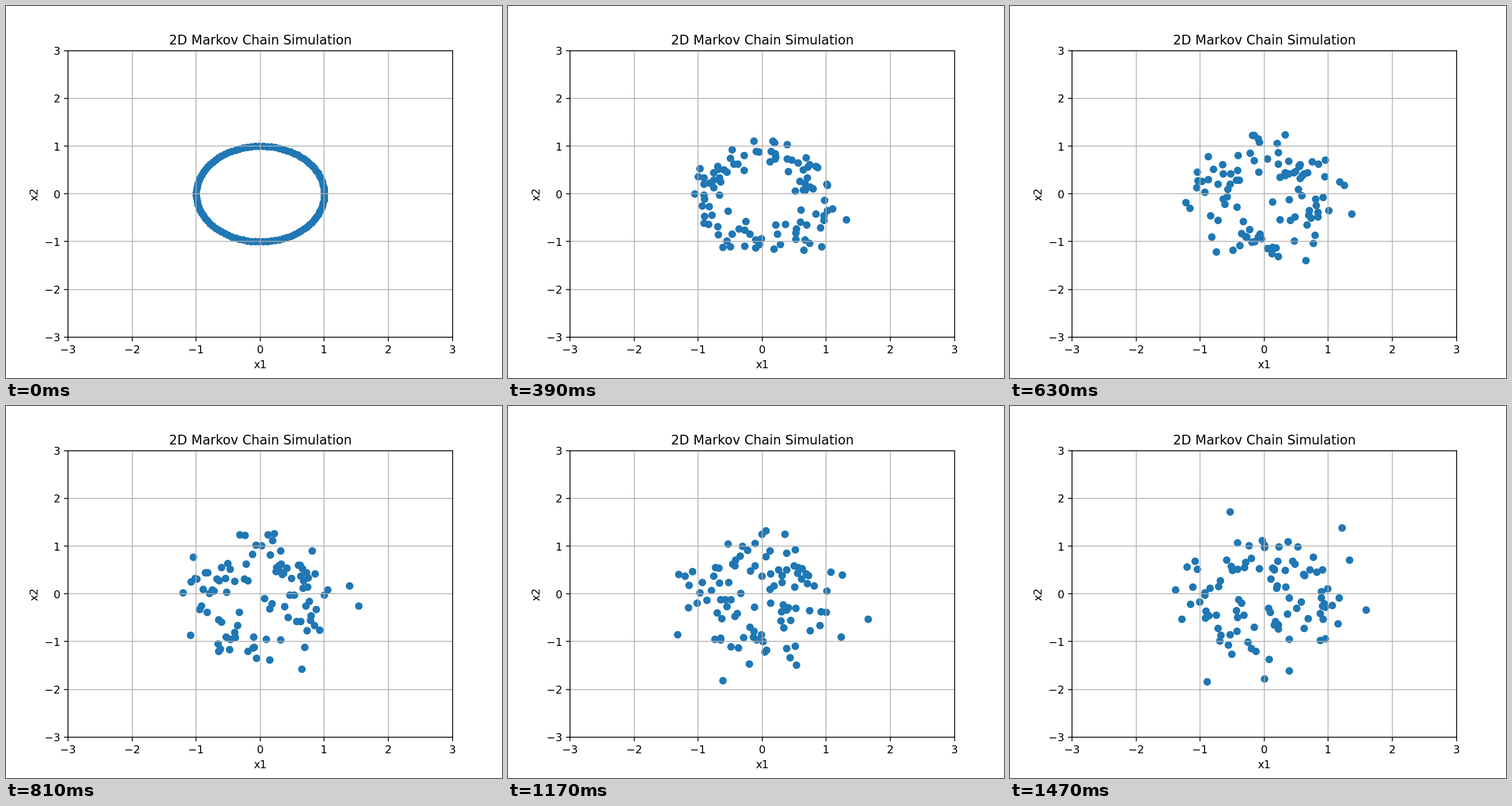
Recreate the animation shown at these times as a matplotlib script. Size 864 px wide and 648 px high, loop 1.5 s.

```python
import numpy as np
import matplotlib.pyplot as plt
from matplotlib.animation import FuncAnimation

FRAMES, INTERVAL = 50, 30
COUNT = 100
PULL = 0.995               # slight drift of every walker towards the centre
STEP_RANGE = 0.045, 0.1    # noise per step, growing over the loop


def random_walks():
    """Noisy walks that start on the unit circle: (frame, walker, xy)."""
    rng = np.random.default_rng(7)
    angle = np.linspace(0, 2 * np.pi, COUNT)
    pos = np.column_stack([np.cos(angle), np.sin(angle)])
    walks = [pos]
    for step in np.linspace(*STEP_RANGE, FRAMES - 1):
        pos = PULL * pos + rng.normal(0, step, pos.shape)
        walks.append(pos)
    return np.array(walks)


walks = random_walks()

fig, ax = plt.subplots(figsize=(6.4, 4.8), dpi=135)
dots = ax.scatter(*walks[0].T)
ax.set(xlim=(-3, 3), ylim=(-3, 3), xlabel="x1", ylabel="x2",
       title="2D Markov Chain Simulation")
ax.grid(True)


def update(frame):
    dots.set_offsets(walks[frame])
    return [dots]


anim = FuncAnimation(fig, update, frames=FRAMES, interval=INTERVAL,
                     repeat=True, repeat_delay=0)
plt.show()
```
